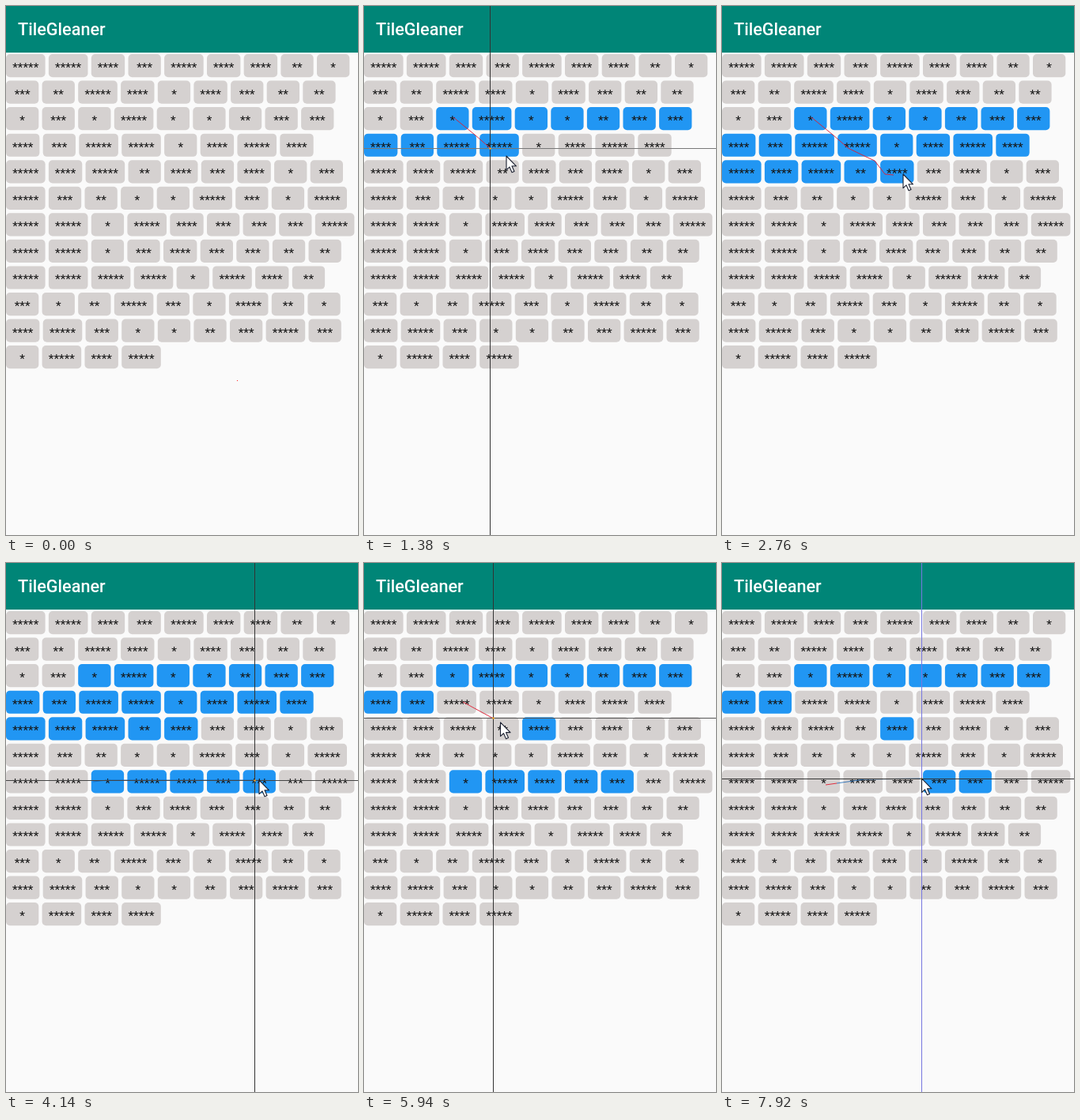
Recreate the animation shown at these times as an HTML page. Size 445 by 670 pixels, loop 8000 ms.

```html
<!DOCTYPE html>
<html lang="en">
<head>
<meta charset="utf-8">
<title>TileGleaner</title>
<style>
  html, body { margin: 0; width: 100%; height: 100%; overflow: hidden; background: #fafafa; }
  svg { display: block; width: 100%; height: 100%; }
  text { font-family: Roboto, "Noto Sans", sans-serif; }
  .chip { font-size: 15.4px; text-anchor: middle; fill: #161616; }
</style>
</head>
<body>
<svg id="stage" viewBox="0 0 445 670" xmlns="http://www.w3.org/2000/svg">
  <rect width="445" height="670" fill="#fafafa"/>
  <rect width="445" height="59" fill="#008577"/>
  <text x="15" y="37" font-size="21.65" font-weight="500" fill="#fff">TileGleaner</text>
  <g id="chips"></g>
  <circle id="dot" cx="292.5" cy="474.5" r=".6" fill="#f00"/>
  <path id="fast" fill="none" stroke="#1464b4" stroke-width=".8"/>
  <path id="slow" fill="none" stroke="#e01c30" stroke-width=".9"/>
  <path id="vline"/>
  <path id="hline"/>
  <circle id="tip" r="1.3" fill="#f0a020"/>
  <path id="cursor" d="M0 0V17.6L4 13.9L7 20.8L10 19.5L7 12.8H12.5Z"
        fill="#fff" stroke="#1b2030" stroke-width="1.1" stroke-linejoin="round"/>
</svg>
<script>
const LOOP = 8000, STEP = 60, LAG = 120;
const TOP = 61, PITCH = 33.55, GAP = 4.3, SLOW = 0.2;

// stars per chip, row by row
const ROWS = ['554354421', '325414322', '131511233', '43551454', '545243413', '532115315',
              '551543335', '551343322', '55551542', '312531521', '453112353', '1545'];

// pointer track: time, x, y
const TRACK = [
  [120, 331, 97], [360, 200, 158], [600, 113, 141], [720, 113, 141],
  [1100, 140, 163], [1260, 159.5, 180], [1380, 180, 190], [1600, 193, 196],
  [2000, 206, 213], [2220, 217, 214], [2460, 217, 214], [2640, 231, 208],
  [2760, 229, 213], [3240, 110, 268], [3300, 110, 277], [3380, 128, 275],
  [4040, 320, 275], [4260, 320, 275], [5040, 150, 172], [5220, 137, 169],
  [5340, 125, 176], [6060, 182, 207], [6420, 182, 207], [6540, 192, 270],
  [6900, 131, 281], [7140, 145, 279], [7260, 145, 279], [7400, 180, 274],
  [7740, 252.5, 273]
];

const DRAGS = [
  { down: 780, up: 2400, on: true, v: '#333', h: '#777' },
  { down: 3420, up: 4260, on: true, v: '#333', h: '#444' },
  { down: 5460, up: 6240, on: false, v: '#333', h: '#555' },
  { down: 7020, up: LOOP, on: false, v: '#7878e0', h: '#333' }
];

const $ = id => document.getElementById(id);

function set(el, attrs) {
  for (const k in attrs) el.setAttribute(k, attrs[k]);
  return el;
}

function make(tag, attrs) {
  const el = document.createElementNS('http://www.w3.org/2000/svg', tag);
  return $('chips').appendChild(set(el, attrs));
}

const chips = [];
ROWS.forEach((stars, row) => {
  let x = 0;
  const y = TOP + row * PITCH;
  for (const n of stars) {
    const width = n === '5' ? 49.6 : n === '4' ? 42.4 : 41.3;
    const rect = make('rect', { x, y, width, height: 29.2, rx: 5 });
    make('text', { x: x + width / 2, y: y + 22, class: 'chip' }).textContent = '*'.repeat(n);
    chips.push({ row, x, rect });
    x += width + GAP;
  }
});

function pointerAt(t) {
  let i = 1;
  while (i < TRACK.length - 1 && TRACK[i][0] < t) i++;
  const [t0, x0, y0] = TRACK[i - 1], [t1, x1, y1] = TRACK[i];
  const k = Math.min(1, Math.max(0, (t - t0) / (t1 - t0)));
  return { x: x0 + (x1 - x0) * k, y: y0 + (y1 - y0) * k };
}

function chipAt(p) {
  const row = Math.floor((p.y - TOP) / PITCH);
  return chips.findLastIndex(c => c.row === row && c.x <= p.x);
}

function drawTrail(from, to) {
  const times = [from, ...TRACK.map(k => k[0]).filter(t => t > from && t < to), to];
  let slow = '', fast = '';
  for (let i = 1; i < times.length; i++) {
    const a = pointerAt(times[i - 1]), b = pointerAt(times[i]);
    const seg = `M${a.x} ${a.y}L${b.x} ${b.y}`;
    if (Math.hypot(b.x - a.x, b.y - a.y) < SLOW * (times[i] - times[i - 1])) slow += seg;
    else fast += seg;
  }
  set($('slow'), { d: slow });
  set($('fast'), { d: fast });
}

function show(visible, ...ids) {
  for (const id of ids) $(id).style.display = visible ? '' : 'none';
}

function render(time) {
  const t = Math.floor(time / STEP) * STEP;
  const started = DRAGS.filter(d => d.down <= t);
  const last = started[started.length - 1];
  const held = !!last && t < last.up;

  const picked = chips.map(() => false);
  for (const d of started) {
    const first = chipAt(pointerAt(d.down - LAG));
    const end = chipAt(pointerAt(Math.min(t, d.up) - LAG));
    picked.fill(d.on, first, end + 1);
  }
  chips.forEach((c, i) => set(c.rect, { fill: picked[i] ? '#2196f3' : '#d5d1d0' }));

  show(!last, 'dot');
  show(last, 'slow', 'fast');
  if (last) drawTrail(last.down - LAG, Math.min(t, last.up) - LAG);

  show(held, 'vline', 'hline', 'tip');
  if (held) {
    const p = pointerAt(t - LAG);
    const x = Math.floor(p.x) + 0.5, y = Math.floor(p.y) + 0.5;
    set($('vline'), { d: `M${x} 0V670`, stroke: last.v });
    set($('hline'), { d: `M0 ${y}H445`, stroke: last.h });
    set($('tip'), { cx: x, cy: y });
  }

  const c = pointerAt(t);
  show(t >= TRACK[0][0], 'cursor');
  set($('cursor'), { transform: `translate(${c.x} ${c.y})` });
}

const start = performance.now();
function tick() {
  render((performance.now() - start) % LOOP);
  requestAnimationFrame(tick);
}
tick();
</script>
</body>
</html>
```
